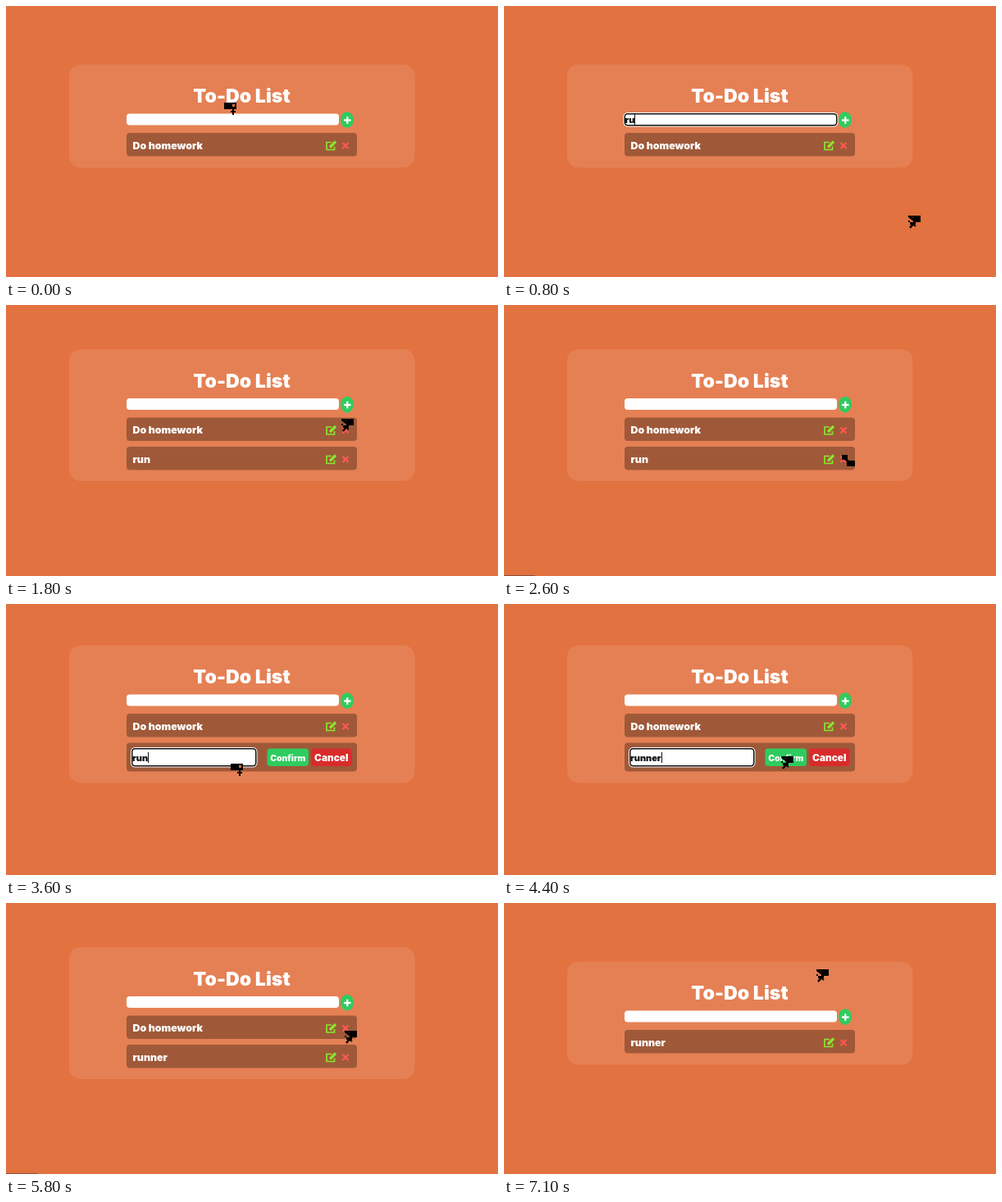
Animation, 600 px wide and 331 px high, one loop 7.2 s. Source, as an HTML page with a canvas:

```html
<!DOCTYPE html>
<html lang="en">
<head>
<meta charset="utf-8">
<title>To-Do List</title>
<style>
html, body { margin: 0; width: 100%; height: 100%; overflow: hidden; background: #e27240; }
canvas { display: block; }
</style>
</head>
<body>
<canvas id="stage" width="600" height="331"></canvas>
<script>
const ctx = document.getElementById('stage').getContext('2d');
const LOOP = 7200, STEP = 100;
const BG = '#e27240', GREEN = '#2ecc5f', LIME = '#8be52f', RED = '#ff5a50', INK = '#111';
const FOCUS = 200, ADD = 1800, EDIT = 3000, CONFIRM = 4500, REMOVE = 6000;

// Where the pointer turns: time, left, top
const turns = [
  [0, 266, 118], [500, 554, 305], [1300, 361, 151], [1700, 409, 137],
  [2600, 412, 182], [EDIT, 391, 183], [3600, 274, 195], [4400, 338, 186],
  [5000, 411, 163], [5800, 413, 156], [6500, 361, 46], [7100, 381, 81],
  [LOOP, 266, 118]
];

const within = (t, from, to) => t >= from && t < to;
const typed = (text, t, from) => text.slice(0, Math.max(0, Math.floor((t - from) / 200)));

function pointerAt(t) {
  const i = turns.findIndex(turn => turn[0] > t);
  const [t0, x0, y0] = turns[i - 1], [t1, x1, y1] = turns[i];
  const k = (t - t0) / (t1 - t0), ease = k * k * (3 - 2 * k);
  return [Math.round(x0 + (x1 - x0) * ease), Math.round(y0 + (y1 - y0) * ease)];
}

function box(x, y, w, h, r, fill) {
  ctx.fillStyle = fill;
  ctx.beginPath();
  ctx.roundRect(x, y, w, h, r);
  ctx.fill();
}

function label(text, x, y, size, color = '#fff', align = 'left') {
  ctx.font = `900 ${size}px Inter, "Open Sans", sans-serif`;
  ctx.textAlign = align;
  ctx.fillStyle = color;
  ctx.fillText(text, x, y);
  return ctx.measureText(text).width;
}

function line(color, width, ...points) {
  ctx.strokeStyle = color;
  ctx.lineWidth = width;
  ctx.beginPath();
  points.forEach(([x, y]) => ctx.lineTo(x, y));
  ctx.stroke();
}

function cross(x, y, r, color, angle = 0) {
  ctx.save();
  ctx.translate(x, y);
  ctx.rotate(angle);
  line(color, 2.3, [-r, 0], [r, 0]);
  line(color, 2.3, [0, -r], [0, r]);
  ctx.restore();
}

function field(x, y, w, h, text, baseline) {
  [[1.5, '#fff'], [.5, INK], [-1, '#fff']].forEach(([grow, color]) =>
    box(x - grow, y - grow, w + 2 * grow, h + 2 * grow, 4 + grow, color));
  const end = x + .5 + label(text, x + .5, baseline, 11, INK);
  ctx.fillRect(Math.round(end), baseline - 11, 1, 13);
}

function button(text, x, y, w, size, color) {
  box(x, y, w, 21.5, 4, color);
  label(text, x + w / 2, y + 15.5, size, '#fff', 'center');
}

function task(text, y) {
  box(147, y, 281, 28.5, 4, '#9f5939');
  label(text, 154.5, y + 19.5, 12.4);
  const mid = y + 15.5;
  line(LIME, 1.7, [397, mid - 4], [391, mid - 4], [391, mid + 5], [400.5, mid + 5], [400.5, mid + 1]);
  line(LIME, 3.2, [395, mid + 2], [402, mid - 5]);
  cross(414, mid, 5, RED, Math.PI / 4);
}

function editor(text, y) {
  box(147, y, 281, 35, 4, '#9f5939');
  field(153.5, y + 7, 151.5, 21.5, text, y + 22.5);
  button('Confirm', 318.5, y + 7, 50.5, 10.4, GREEN);
  button('Cancel', 372, y + 7, 49.5, 11.8, '#da2b2b');
}

function pointer(x, y, kind) {
  const part = (dx, dy, w, h, color = '#000') => box(x + dx, y + dy, w, h, 0, color);
  if (kind === 'beam') {
    part(0, 0, 15, 8);
    part(10, 8, 2, 7);
    part(8, 10, 6, 2);
    part(10, 2, 3, 3, BG);
  } else if (kind === 'hand') {
    part(0, 1, 7, 6);
    part(6, 8, 10, 7);
    line('#000', 3, [x + 4, y + 5], [x + 9, y + 11]);
  } else {
    part(6, 0, 9, 8);
    line('#000', 2, [x, y + 1], [x + 8, y + 1]);
    line('#000', 3, [x + 1, y + 1], [x + 9, y + 7]);
    part(0, 6, 2, 2);
    part(2, 8, 7, 3);
    line('#000', 2.5, [x + 7, y + 9], [x + 2, y + 15]);
    line('#000', 2, [x + 5, y + 10], [x + 9, y + 13]);
  }
}

function draw(t) {
  const both = within(t, ADD, REMOVE), editing = within(t, EDIT, CONFIRM);
  const height = 126 + (both ? 35 : 0) + (editing ? 7 : 0);
  const top = 134.5 - height / 2;

  box(0, 0, 600, 331, 0, BG);
  box(77, top, 421.5, height, 14, '#e58054');
  label('To-Do List', 287.5, top + 46.5, 23.2, '#fff', 'center');

  const fieldY = top + 60;
  if (within(t, FOCUS, ADD)) field(147, fieldY, 259, 14.5, typed('run', t, 400), fieldY + 11.5);
  else box(147, fieldY, 259, 14, 4, '#fff');

  ctx.fillStyle = GREEN;
  ctx.beginPath();
  ctx.ellipse(416, top + 67.5, 8, 9.8, 0, 0, 7);
  ctx.fill();
  cross(416.3, top + 68, 4.3, '#fff');

  const firstY = top + 83.5, secondY = firstY + 35.5;
  task(t < REMOVE ? 'Do homework' : 'runner', firstY);
  if (editing) editor('run' + typed('ner', t, 3500), secondY);
  else if (both) task(t < CONFIRM ? 'run' : 'runner', secondY);

  // Link hint at the bottom while hovering an icon
  if (within(t, 2500, EDIT) || within(t, 5700, REMOVE)) box(0, 330, 38, 1, 0, '#8a5038');

  const kind = t < 400 || within(t, 3300, 4100) ? 'beam' : within(t, 2400, EDIT) ? 'hand' : 'arrow';
  pointer(...pointerAt(t), kind);
}

const start = performance.now();
function tick() {
  const t = (performance.now() - start) % LOOP;
  draw(Math.floor(t / STEP) * STEP);
  requestAnimationFrame(tick);
}
tick();
</script>
</body>
</html>
```
